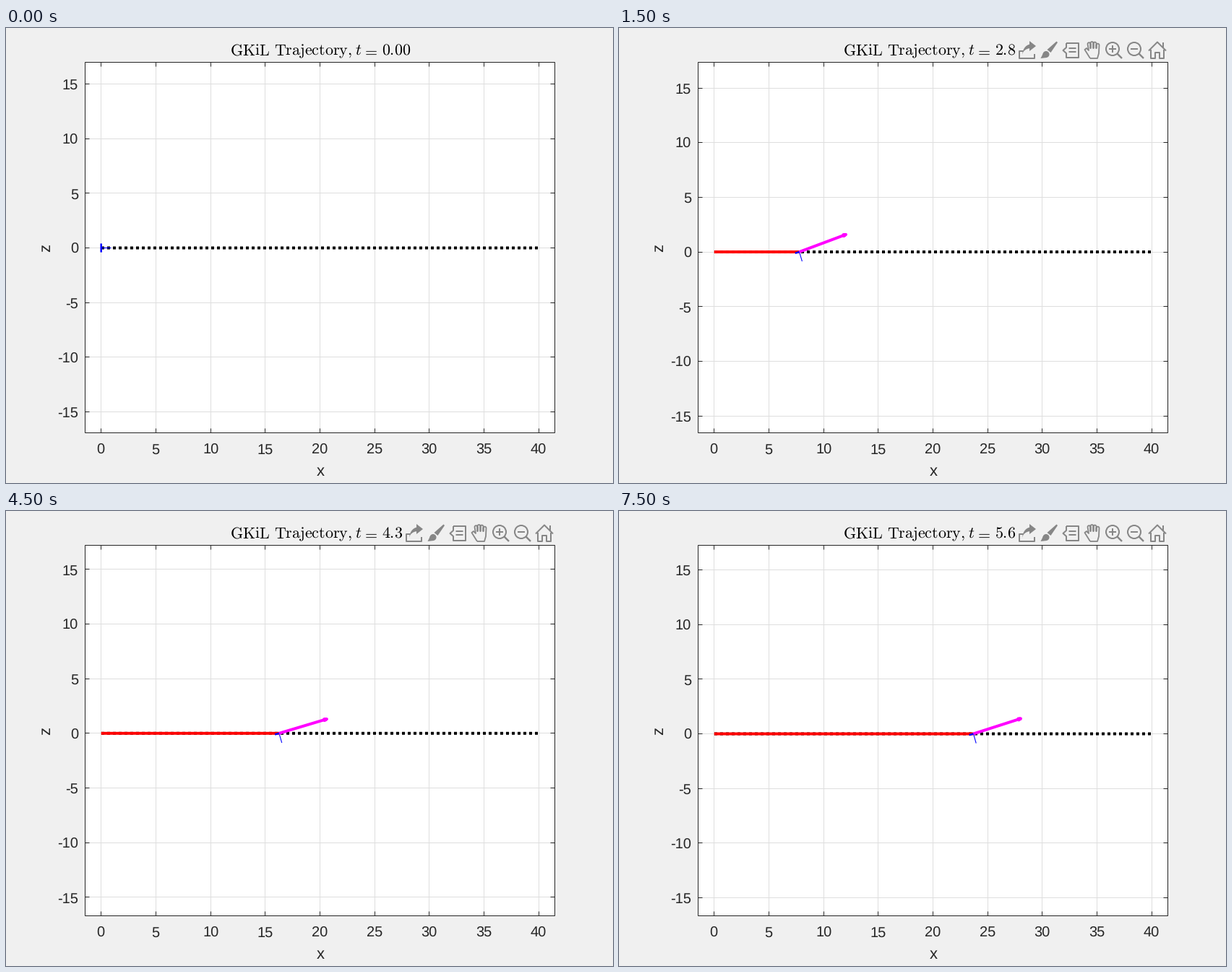
Animation of 840x630 px, one loop 8000 ms. Source, as a matplotlib script:

```python
import numpy as np
import matplotlib.pyplot as plt
from matplotlib.animation import FuncAnimation
from matplotlib.patches import Circle, Polygon, Rectangle

W, H, DPI = 840, 630, 80
PT = 72 / DPI                       # points per pixel
LEFT, RIGHT, TOP, BOTTOM = 109.5, 759.5, 47.5, 560.5
X0, MID, SCALE = 131.7, 304.5, 15.135
INK, GRID, ICON = "#262626", "#dedede", "#868686"
FRAMES, STEP = 16, 500
CRUISE, RAMP = 5.9, 3.165           # top speed, time to reach it

plt.rcParams.update({
    "font.family": "Liberation Sans",
    "mathtext.fontset": "cm",
    "text.hinting": "none",
})

fig = plt.figure(figsize=(W / DPI, H / DPI), dpi=DPI, facecolor="#f0f0f0")
ax = fig.add_axes([0, 0, 1, 1])
ax.set(xlim=(0, W), ylim=(H, 0))
ax.axis("off")


def crisp(v):
    """Centre of the pixel that holds v."""
    return np.floor(v) + 0.5


def line(xs, ys, color, width=1.0, z=1, **kw):
    return ax.plot(xs, ys, color=color, lw=width * PT, zorder=z, snap=False,
                   solid_capstyle="butt", **kw)[0]


def text(x, y, s, px=20, color=INK, **kw):
    return ax.text(x, y, s, fontsize=px * PT, color=color,
                   va="baseline", zorder=8, **kw)


def build_axes():
    for z, fc, ec in ((0, "white", "none"), (2, "none", INK)):
        ax.add_patch(Rectangle((LEFT, TOP), RIGHT - LEFT, BOTTOM - TOP, fc=fc,
                               ec=ec, lw=PT, zorder=z, snap=False))
    for v in range(0, 41, 5):
        x = crisp(X0 + v * SCALE)
        line([x, x], [TOP, BOTTOM], GRID)
        line([x, x], [BOTTOM - 6, BOTTOM], INK, z=2)
        line([x, x], [TOP, TOP + 6], INK, z=2)
        text(x - 0.4, 589.7, str(v), ha="center")
    text(435.5, 619.5, "x", 22, ha="center")
    text(61, 305, "z", 22, ha="center", rotation=90, rotation_mode="anchor")


def build_rows():
    rows = []
    for v in range(-15, 16, 5):
        parts = [line([LEFT, RIGHT], [0, 0], GRID),
                 line([LEFT, LEFT + 6], [0, 0], INK, z=2),
                 line([RIGHT - 6, RIGHT], [0, 0], INK, z=2)]
        rows.append((v, parts, text(100.2, 0, str(v), ha="right")))
    return rows


def build_toolbar():
    """Seven icons, 30 px apart, each drawn around its own centre."""
    items = []
    cy = 31

    def stroke(cx, pts, width=2.0, close=False):
        pts = np.array(list(pts) + list(pts[:1] if close else []))
        items.append(line(cx + pts[:, 0], cy + pts[:, 1], ICON, width, 9,
                          solid_joinstyle="round"))

    def fill(cx, pts):
        items.append(ax.add_patch(Polygon(np.array(pts) + (cx, cy),
                                          fc=ICON, ec="none", zorder=9)))

    def ring(cx, x, y, r, fc="none"):
        items.append(ax.add_patch(Circle((cx + x, cy + y), r, fc=fc, ec=ICON,
                                         lw=2 * PT, zorder=9)))

    def mirror(half):
        return [(-x, y) for x, y in half] + half[::-1]

    share, brush, tip, hand, zoom_in, zoom_out, home = range(565, 746, 30)

    stroke(share, [(-6, 1), (-11, 1), (-11, 11), (10, 11), (10, 5)])
    fill(share, [(3, -13), (12, -6), (3, 1)])
    a = np.linspace(0, np.pi / 2, 12)
    outer, inner = (np.c_[5 - 12 * np.cos(a), 7 - ry * np.sin(a)]
                    for ry in (15.5, 10))
    fill(share, np.vstack([outer, inner[::-1]]))

    fill(brush, [(10.5, -12.5), (12, -11), (2.5, 3), (-2.5, -1)])
    ring(brush, -4, 5.5, 3.5, ICON)
    fill(brush, [(-8, 4), (-3, 10), (-11.5, 11)])

    stroke(tip, [(-6, -10), (11, -10), (11, 10), (-6, 10), (-6, 4),
                 (-10.5, 0), (-6, -4)], close=True)
    for y in (-3, 2):
        stroke(tip, [(-2.5, y), (7.5, y)])

    outline = [(-3, 11), (-10.5, -1), (-8, -3), (-5, 0)]
    for k in range(4):              # finger tips
        top = -10 + 0.8 * (k - 1.2) ** 2
        outline += [(-4.5 + 4 * k - 2 * np.cos(u), top - 2 * np.sin(u))
                    for u in np.linspace(0, np.pi, 7)]
        if k < 3:
            outline.append((-2.5 + 4 * k, -3))
    stroke(hand, outline + [(9, 4), (7, 11)], 1.8, True)

    for cx in (zoom_in, zoom_out):
        ring(cx, -2, -2, 9)
        stroke(cx, [(4.5, 4.5), (11, 11)], 2.4)
        stroke(cx, [(-7, -2), (3, -2)])
    stroke(zoom_in, [(-2, -7), (-2, 3)])

    stroke(home, mirror([(12, 0.5), (0, -11.5)]))
    stroke(home, mirror([(9, -1), (9, 11), (3, 11), (3, 3)]))
    stroke(home, [(8, -4), (8, -11)])
    return items


build_axes()
rows = build_rows()
toolbar = build_toolbar()

for x, s in ((309.5, r"$\mathrm{GKiL}$"), (371, r"$\mathrm{Trajectory,}$"),
             (482.8, "$t$")):
    text(x, 37.5, s, 22, "black")
text(504.2, 37.5, "$=$", 22, "black", ha="center")
clock = text(520.3, 37.5, "", 22, "black")

path = line([], [], "black", 4, 3, linestyle=(0, (1, 1)), dash_capstyle="butt")
trail = line([], [], "red", 4, 4)
wing = line([], [], "blue", 2.5, 5)
chord = line([], [], "blue", 1.1, 5)
thrust = line([], [], "magenta", 4, 6, solid_joinstyle="round")


def unit(deg):
    a = np.radians(deg)
    return np.array([np.cos(a), np.sin(a)])


def sim_time(i):
    """The clock jumps ahead after the start, then runs almost evenly."""
    return np.interp(i, [0, 1, 3, 5, 9, 13, 15],
                     [0, 0.1, 2.89, 3.34, 4.34, 5.152, 5.6])


def distance(t):
    """Constant acceleration up to cruising speed."""
    return CRUISE * (t * t / (2 * RAMP) if t < RAMP else t - RAMP / 2)


def thrust_angle(t):
    """A fast drop from lift-off, then a slow sway."""
    return 18.9 - 2.5 * np.cos(1.25 * (t - 4.7)) + 67 * np.exp(-t / 0.3)


def pitch_angle(t):
    return 74 * (1 - np.exp(-t / 0.6))


def update(i):
    moving = i > 0
    t = sim_time(i)
    px = X0 + distance(t) * SCALE
    angle, pitch = thrust_angle(t), pitch_angle(t)
    nose, up, force = unit(-pitch), unit(90 - pitch), unit(angle)
    head = 4.55 * force * moving

    # the view stays centred on the drawn heights
    heights = np.array([0.9 * nose, 0.4 * up, -0.4 * up, head])[:, 1]
    z0 = MID + SCALE * (heights.max() + heights.min()) / 2

    def place(artist, *pts):
        p = np.array(pts) * SCALE
        artist.set_data(px + p[:, 0], z0 - p[:, 1])

    for v, parts, label in rows:
        y = z0 - v * SCALE
        for part in parts:
            part.set_ydata([crisp(y)] * 2)
        label.set_y(y + 7.6)

    path.set_data([132, 736.2], [z0, z0])
    trail.set_data([X0, px], [z0, z0])
    origin = np.zeros(2)
    place(wing, 0.4 * up, -0.4 * up)
    place(chord, origin, 0.9 * nose)
    back, side = head - 0.22 * force, 0.07 * unit(angle + 90)
    place(thrust, origin, head, back + side, back - side, head)

    for item in (thrust, trail, *toolbar):
        item.set_visible(moving)
    # the toolbar hides the last digit
    digits = f"{t + 0.004:.2f}"[:3] if moving else "0.00"
    clock.set_text(rf"$\mathrm{{{digits}}}$")
    return []


anim = FuncAnimation(fig, update, frames=FRAMES, interval=STEP,
                     repeat=True, repeat_delay=0, blit=False)
plt.show()
```
